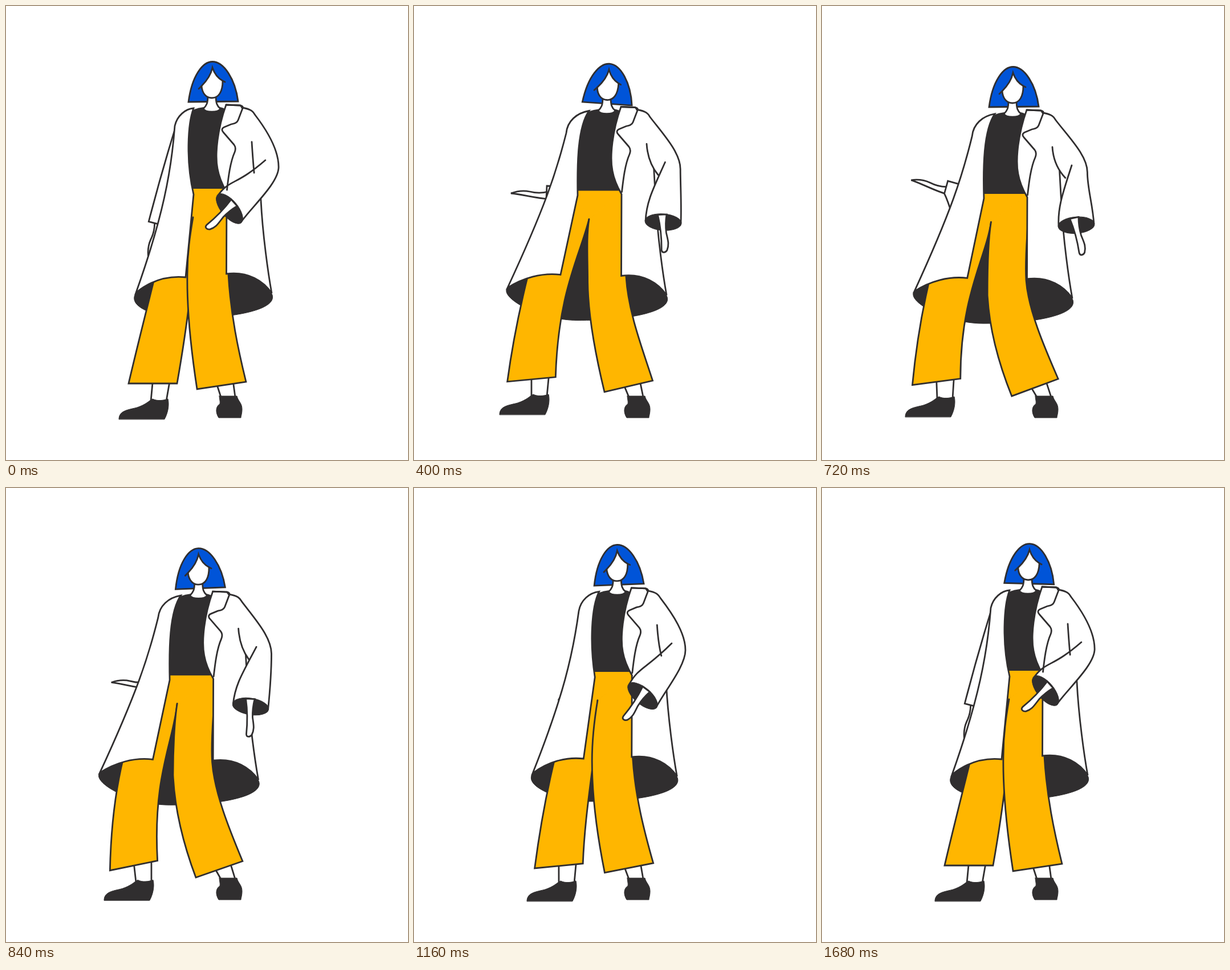
Recreate the animation shown at these times as an HTML page. Size 705 by 795 pixels, loop 2200 ms.

```html
<!DOCTYPE html>
<html lang="en">
<head>
<meta charset="utf-8">
<title>Stepping figure</title>
<style>
  html, body { margin: 0; width: 100%; height: 100%; overflow: hidden; background: #fff; }
  svg { display: block; width: 100%; height: 100%; }
  path, ellipse { fill: #fff; stroke: #302e2f; stroke-width: 2.8; stroke-linecap: round; }
  .dark { fill: #302e2f; stroke-width: 1; }
  .yellow { fill: #ffb600; }
  .blue { fill: #0054d8; }
  .line { fill: none; }
  .flat { stroke: none; }
  #pelvis { stroke: #ffb600; stroke-width: 1.5; }
</style>
</head>
<body>
<svg viewBox="0 0 705 795">
  <g class="body"><path id="lining" class="dark"/></g>
  <path id="ankleL"/>
  <path id="shoeL" class="dark" d="M198 723.5C198 708 215 707 230 703C245 698 250 692 257 688C265 692 275 691 284 688C287 700 283 715 278 723.5Z"/>
  <path id="ankleR"/>
  <path class="dark" d="M374 683H405C407 692 414 695 414 706C414 714 412 718 412 721H373C366 710 369 700 375 697C376 692 374 688 374 683Z"/>
  <g id="armL">
    <path d="M-2 -2C2 12 0 22 -2 30C-5 44 -2 55 1 63C3 42 10 20 11 -4"/>
    <path d="M0 -175Q-8 -90 -12 0L11 1Q22 -8 45 -21L30 -175Z"/>
  </g>
  <path id="legL" class="yellow"/>
  <path id="pelvis" class="yellow"/>
  <path id="legR" class="yellow"/>
  <g class="body">
    <path class="dark flat" d="M330 181Q338 178 347 177H375Q382 178 386 182L392 320H303V240L306 215Z"/>
    <path id="coatL"/>
    <path d="M386 173C371 215 366 260 371 285C374 302 380 314 387 326L386.5 469C425 464 452 482 466 503C460 470 450 400 447 340L443 270L430 200L411 174Z"/>
    <path id="armFill" class="flat"/>
    <path id="armLine" class="line"/>
    <path class="line" d="M386 173L411 174C415 175 416 177 415 179L407 200C405 205 400 206 395 207L383 212C378 214 378 218 381 221L400 243C403 247 403 251 401 256C393 274 390 300 387.5 322"/>
    <g id="cuff">
      <ellipse class="dark" rx="32" ry="14.5"/>
      <path id="handR" d="M-7.5 0C-4 18 -2 34 -3.5 62C-3 68 3 67 6 63C11 52 8 44 6 32C5 20 6 10 8 0Z"/>
    </g>
    <path id="hair" class="blue" d="M320 168C326 122 345 97.5 362 97.5C382 97.5 402 128 407 167Z"/>
    <path d="M354 157C354 170 352 174 346 180C350 187 372 187 376 180C370 175 368 170 368 157"/>
    <g id="face">
      <path d="M362 108C359 122 352 131 343 140C344 153 351 161 361 161C373 161 380 150 380 131C371 126 365 117 362 108Z"/>
      <path class="line" d="M343 140L338 145M380 131L384 133"/>
    </g>
  </g>
</svg>
<script>
const LOOP = 2200, STEP = 40, RAD = Math.PI / 180;
const $ = id => document.getElementById(id);
const set = (id, d) => $(id).setAttribute('d', d);
const turn = (id, value) => $(id).setAttribute('transform', value);
const add = ([x, y], dx, dy) => [x + dx, y + dy];
const polar = (angle, r) => [r * Math.cos(angle * RAD), r * Math.sin(angle * RAD)];

// Smooth interpolation through [time, ...values] rows, without overshoot.
function track(...rows) {
  const last = rows.length - 1;
  const rate = (j, c) => (rows[j + 1][c] - rows[j][c]) / (rows[j + 1][0] - rows[j][0]);
  const slope = (j, c) => {
    if (j === 0 || j === last) return 0;
    const a = rate(j - 1, c), b = rate(j, c);
    return a * b > 0 ? 2 * a * b / (a + b) : 0;
  };
  return t => {
    if (t >= rows[last][0]) return rows[last].slice(1);
    let j = 0;
    while (t >= rows[j + 1][0]) j++;
    const h = rows[j + 1][0] - rows[j][0], u = (t - rows[j][0]) / h, w = 1 - u;
    return rows[j].map((v, c) =>
      v * w * w * (1 + 2 * u) + rows[j + 1][c] * u * u * (3 - 2 * u) +
      h * u * w * (w * slope(j, c) - u * slope(j + 1, c))).slice(1);
  };
}

// Body shift; its drop also bends the standing leg.
const body = track([0, 0, 0], [240, -11.5, 0], [400, -23, 3.5], [720, -27, 9], [960, -17, 6.5], [1300, 0, 0]);
// Stepping foot: shift and tilt of the trouser hem.
const step = track([0, 0, 0, 0], [240, -21, -10.5, -10.8], [400, -48, -8, -5.4],
  [720, -52, -4, -7.5], [960, 0, 0, -15], [1300, 0, 0, 0]);
const coatOpen = track([0, 0], [240, 0.92], [400, 1], [720, 0.95], [960, 1], [1300, 0]);
// Back arm: wrist position and angle.
const reach = track([0, 262, 380, 12], [240, 268, 364, 70], [400, 233, 327, 90], [570, 199, 310, 103],
  [720, 218, 318, 103], [960, 268, 363, 70], [1300, 262, 380, 12]);
const swing = track([0, 30.7], [240, 18], [400, 2], [570, -5.6], [720, -3.2], [960, 15], [1260, 27.5], [1480, 30.7]);
// Tilt of face and hair.
const tilt = track([0, 0, 0], [240, 2.7, 5.3], [400, 3, 4.6], [720, 0, 0],
  [960, -1.6, -2.6], [1360, 0.3, 0], [1680, 2, 2.2]);

const COAT_SHUT = [329, 179, 315, 180, 300, 192, 296, 210, 290, 290, 275, 370, 228, 502,
  255, 480, 285, 472, 315, 475, 329, 330, 315, 270, 319, 205, 329, 179];
const COAT_WIDE = [330, 180, 308, 184, 292, 198, 290, 219, 272, 290, 252, 350, 187, 490,
  213, 473, 247, 463, 280, 467, 310, 328, 309, 272, 310, 208, 330, 180];

function drawCoat(open) {
  const n = COAT_SHUT.map((v, i) => v + (COAT_WIDE[i] - v) * open);
  const tail = n.slice(12, 14);
  set('coatL', `M${n.slice(0, 2)}C${n.slice(2, 20)}L${n.slice(20, 22)}C${n.slice(22)}Z`);
  set('lining', `M${tail}C${add(tail, 4 * open - 20, 30 - 14 * open)} ${add(tail, 55, 547 - tail[1])} 310 547
    C400 547 475 532 467 506L400 360L330 360Z`);
}

function drawLegs([dx, dy], [fx, fy, shin], open) {
  const waistL = [303 + dx, 320 + dy], waistR = [390 + dx, 320 + dy];
  const crotch = [328 + 0.7 * dx - 1.4 * dy, 370 + 0.9 * dy];

  const footL = [257.5 + fx + 0.65 * shin, 661 + fy - 0.15 * shin];
  const wideL = polar(shin, 42.5);
  const innerL = add(footL, ...wideL), outerL = add(footL, -wideL[0], -wideL[1]);
  const hipL = [footL[0] + 4.5 + 1.9 * shin, 470];
  set('legL', `M${crotch}
    C${add(crotch, 6 - 10 * open + 1.5 * fy, 80 - 15 * open)} ${add(innerL, 16 + 2.1 * shin, -91 - 60 * open)} ${innerL}
    L${outerL}C${add(outerL, 14 + 1.1 * shin, -60)} ${add(hipL, -17, 68)} ${hipL}L${waistL}`);
  set('pelvis', `M${waistL}L${waistR}L${crotch}Z`);
  set('ankleL', `M${add(footL, 0, -6)}L${[254 + fx, 692 + fy]}L${[281 + fx, 692 + fy]}L${add(footL, 31, -12)}`);
  turn('shoeL', `translate(${fx} ${fy})`);

  const footR = [378 - 0.5 * dy, 664.5 + 0.4 * dy];
  const wideR = polar(-8.6 - 1.3 * dy, 43.4);
  const outerR = add(footR, ...wideR), innerR = add(footR, -wideR[0], -wideR[1]);
  const hipR = [390 + 0.45 * dx - 2.2 * dy, 470 + 1.2 * dy];
  const thigh = [318 + 0.2 * dx - 2.5 * dy, 470 + 4 * dy];
  set('legR', `M${waistR}C${add(waistR, -1, 65)} ${add(hipR, -3, -45)} ${hipR}
    C${add(hipR, 4, 70 - 2 * dy)} ${add(outerR, -14 - 1.2 * dy, -57)} ${outerR}
    L${innerR}C${add(innerR, -10 - 1.4 * dy, dy - 65)} ${add(thigh, 0.5 * dy - 1, 62)} ${thigh}
    C${add(thigh, 0, -40)} ${add(crotch, -5, 30)} ${crotch}`);
  set('ankleR', `M${add(footR, -9, -4)}L377 685H402L${add(footR, 20, -9)}`);
}

// The cuff swings on a circle; elbow and creases follow its angle.
function drawArm(a) {
  const cuff = add([465, 232], ...polar(90 + a, 143));
  const slant = 1.6 * a + 1, half = polar(slant, 31);
  const outer = add(cuff, ...half), inner = add(cuff, -half[0], -half[1]);
  const sleeve = polar(1.15 * a - 90, 34);
  const shoulder = [437, 191], elbow = [491 - 0.42 * a, 282];
  const crease = [464 - 0.3 * a, 270], pit = [452 - 0.55 * a, 292];
  const back = `M414 178C432 181 434 186 ${shoulder}C${add(shoulder, 23, 30)} ${add(elbow, 0, -29)} ${elbow}
    C${add(elbow, 0, 28)} ${add(outer, ...sleeve)} ${outer}`;
  const front = `${inner}C${add(inner, ...sleeve)} ${add(crease, -18 - 1.1 * a, 45)} ${crease}`;
  const fold = `${pit}Q433 270 431 238`;
  set('armFill', `${back}L${front}L${fold}Z`);
  set('armLine', `${back}M${front}M${fold}`);
  turn('cuff', `translate(${cuff}) rotate(${slant})`);
  turn('handR', `translate(-3 -13) rotate(${0.15 * a - 7})`);
}

function draw(t) {
  const shift = body(t), [open] = coatOpen(t), [face, hair] = tilt(t), [x, y, angle] = reach(t);
  for (const g of document.querySelectorAll('.body')) {
    g.setAttribute('transform', `translate(${shift})`);
  }
  turn('face', `rotate(${face} 361 165)`);
  turn('hair', `rotate(${face} 361 165) rotate(${hair - face} 362 108)`);
  turn('armL', `translate(${x} ${y}) rotate(${angle})`);
  drawCoat(open);
  drawLegs(shift, step(t), open);
  drawArm(swing(t)[0]);
}

const start = performance.now();
function tick() {
  const t = (performance.now() - start) % LOOP;
  draw(Math.floor(t / STEP) * STEP);
  requestAnimationFrame(tick);
}
tick();
</script>
</body>
</html>
```
